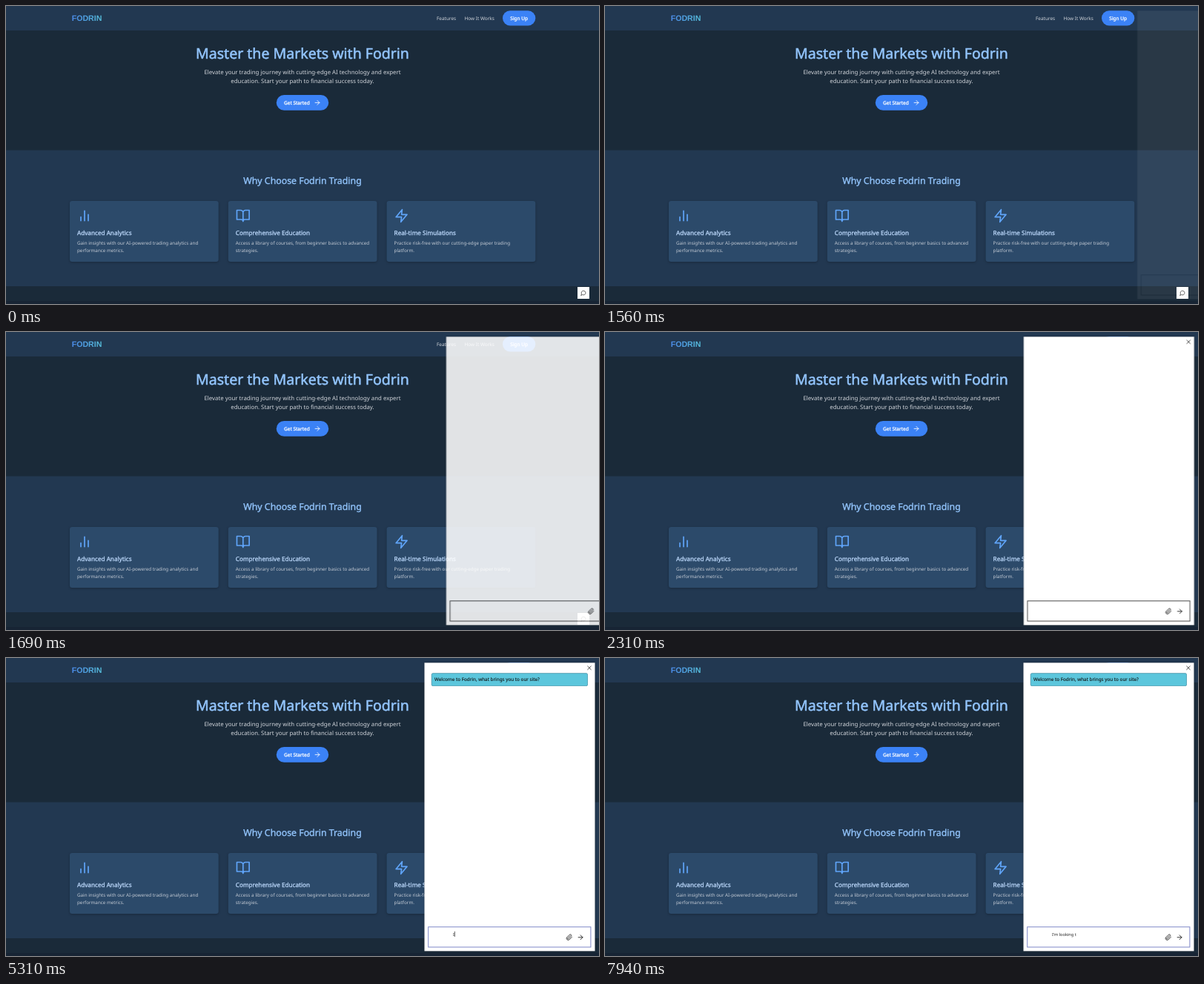
Recreate the animation shown at these times as an HTML page. Size 800 by 402 pixels, loop 8000 ms.

```html
<!DOCTYPE html>
<html lang="en">
<head>
<meta charset="utf-8">
<title>Fodrin Trading</title>
<style>
  html, body { margin: 0; width: 100%; height: 100%; overflow: hidden; background: #1a2a39; }
  svg { display: block; width: 100vw; height: 100vh; }
  text { font-family: "Noto Sans", sans-serif; text-rendering: geometricPrecision; white-space: pre; }

  .band { fill: #223851; }
  .card { fill: #2c4a6a; filter: drop-shadow(0 1px 1.5px #0004); }
  .pill { fill: #3b82f6; }
  .center { text-anchor: middle; }
  .logo { font: bold 10.6px "Liberation Sans", sans-serif; fill: url(#brand); }
  .nav { font-size: 6.45px; fill: #d1d5db; }
  .label { font-size: 6.5px; fill: #fff; stroke: #fff; stroke-width: .28px; }
  .hero { font-size: 19.55px; fill: #93c5fd; stroke: #93c5fd; stroke-width: .5px; }
  .lead { font-size: 7.83px; fill: #d1d5db; }
  .heading { font-size: 12.34px; fill: #93c5fd; stroke: #93c5fd; stroke-width: .35px; }
  .title { font-size: 8.17px; fill: #bfdbfe; stroke: #bfdbfe; stroke-width: .25px; }
  .body { font-size: 6.27px; fill: #c3cad4; }

  .icon { fill: none; stroke: #60a5fa; stroke-width: 2; stroke-linecap: round; stroke-linejoin: round; }
  .icon.light { stroke: #fff; }
  .icon.dark { stroke: #111; }

  .sheet { fill: #fff; filter: drop-shadow(0 .5px 1.2px #0006); }
  .bubble rect { fill: #5cc6dc; stroke: #4aa3bb; stroke-width: .7; filter: drop-shadow(0 .8px .7px #0006); }
  .bubble text { font-size: 6.33px; fill: #111; stroke: #111; stroke-width: .1px; }
  .field { fill: #fff; stroke: #4b4b4b; stroke-width: 1; }
  #typed { font-size: 5.6px; fill: #222; }
  #caret { fill: #222; }

  #panel { animation: reveal 8s infinite; }
  .bubble { animation: greet 8s linear infinite; }
  .field { animation: focus 8s linear infinite; }
  @keyframes reveal {
    0%, 18.98% { opacity: 0; animation-timing-function: ease-in-out; }
    21.85%, 100% { opacity: 1; }
  }
  @keyframes greet { 0%, 35.5% { opacity: 0; } 39.1%, 100% { opacity: 1; } }
  @keyframes focus { 0%, 53.4% { stroke: #4b4b4b; } 55.5%, 100% { stroke: #7f88c8; } }
</style>
</head>
<body>
<svg viewBox="0 0 800 402" preserveAspectRatio="none">
  <defs>
    <linearGradient id="brand">
      <stop offset="0" stop-color="#4b8ae8"/>
      <stop offset="1" stop-color="#55bcd8"/>
    </linearGradient>
    <path id="arrow" d="M5 12h14M12 5l7 7-7 7"/>
  </defs>

  <rect width="800" height="402" fill="#1a2a39"/>
  <rect class="band" width="800" height="33"/>
  <rect class="band" y="194.5" width="800" height="183.5"/>
  <rect y="398" width="800" height="4" fill="#172434"/>

  <text class="logo" x="88.7" y="20.4">FODRIN</text>
  <text class="nav" x="581" y="18.7">Features</text>
  <text class="nav" x="618.5" y="18.7">How It Works</text>
  <rect class="pill" x="670" y="6.3" width="44.3" height="20.2" rx="10.1"/>
  <text class="label center" x="692.2" y="18.7">Sign Up</text>

  <text class="hero center" x="400" y="71">Master the Markets with Fodrin</text>
  <text class="lead center" x="400" y="92.4">Elevate your trading journey with cutting-edge AI technology and expert</text>
  <text class="lead center" x="400" y="104.1">education. Start your path to financial success today.</text>
  <rect class="pill" x="364.8" y="120" width="70.4" height="20.8" rx="10.4"/>
  <text class="label" x="375" y="132.7">Get Started</text>
  <use class="icon light" href="#arrow" transform="translate(415 125.4) scale(.4167)"/>

  <text class="heading center" x="400" y="240.4">Why Choose Fodrin Trading</text>

  <g transform="translate(86 263)">
    <rect class="card" width="200.7" height="82" rx="3.3"/>
    <path class="icon" transform="translate(10 10) scale(.8333)" d="M18 20V10M12 20V4M6 20v-6"/>
    <text class="title" x="10" y="45.8">Advanced Analytics</text>
    <text class="body" x="10" y="59.4">Gain insights with our AI-powered trading analytics and</text>
    <text class="body" x="10" y="69.3">performance metrics.</text>
  </g>
  <g transform="translate(299.8 263)">
    <rect class="card" width="200.7" height="82" rx="3.3"/>
    <path class="icon" transform="translate(10 10) scale(.8333)"
      d="M2 3h6a4 4 0 0 1 4 4v14a3 3 0 0 0-3-3H2zM22 3h-6a4 4 0 0 0-4 4v14a3 3 0 0 1 3-3h7z"/>
    <text class="title" x="10" y="45.8">Comprehensive Education</text>
    <text class="body" x="10" y="59.4">Access a library of courses, from beginner basics to advanced</text>
    <text class="body" x="10" y="69.3">strategies.</text>
  </g>
  <g transform="translate(513.6 263)">
    <rect class="card" width="200.7" height="82" rx="3.3"/>
    <path class="icon" transform="translate(10 10) scale(.8333)" d="M13 2L3 14h9l-1 8 10-12h-9z"/>
    <text class="title" x="10" y="45.8">Real-time Simulations</text>
    <text class="body" x="10" y="59.4">Practice risk-free with our cutting-edge paper trading</text>
    <text class="body" x="10" y="69.3">platform.</text>
  </g>

  <rect x="771" y="379" width="16" height="16" fill="#fff"/>
  <path class="icon dark" transform="translate(775.2 383.2) scale(.32)"
    d="M7.9 20A9 9 0 1 0 4 16.1L2 22z"/>

  <g id="panel">
    <rect class="sheet" x="564.5" y="6.4" width="230" height="389"/>
    <path class="icon dark" transform="translate(782.4 8.8) scale(.38)" stroke-width="2.4" d="M18 6L6 18M6 6l12 12"/>
    <g class="bubble">
      <rect x="574.3" y="20.8" width="210.2" height="16.8" rx="1.6"/>
      <text x="578" y="31.3">Welcome to Fodrin, what brings you to our site?</text>
    </g>
    <rect class="field" x="569.7" y="362.8" width="219.2" height="27.2"/>
    <text id="typed" x="603" y="374.6"></text>
    <rect id="caret" y="368.8" width=".7" height="7.2"/>
    <path class="icon dark" transform="translate(755.3 372.3) scale(.38)"
      d="M21.4 11.1l-9.2 9.1a6 6 0 0 1-8.5-8.4l9.2-9.2a4 4 0 0 1 5.7 5.6l-9.2 9.2a2 2 0 0 1-2.9-2.8l8.5-8.5"/>
    <use class="icon dark" href="#arrow" transform="translate(770 371.8) scale(.42)"/>
  </g>
</svg>
<script>
  const LOOP = 8000;
  const SLIDE_START = 1468;
  const MESSAGE = "I'm looking t";
  const KEY_TIMES = [5310, 5560, 6060, 6250, 6690, 6880, 7060, 7250, 7440, 7630, 7730, 7830, 7940];

  const panel = document.getElementById("panel");
  const typed = document.getElementById("typed");
  const caret = document.getElementById("caret");

  // Underdamped spring: 1 at rest position off stage, settling to 0.
  function spring(seconds) {
    if (seconds <= 0) return 1;
    const decay = 8.4, freq = 8;
    return Math.exp(-decay * seconds) *
      (Math.cos(freq * seconds) + decay / freq * Math.sin(freq * seconds));
  }

  function render(time) {
    const offset = 230 * spring((time - SLIDE_START) / 1000);
    panel.setAttribute("transform", `translate(${offset.toFixed(2)} 0)`);

    const count = KEY_TIMES.filter(key => time >= key).length;
    const text = MESSAGE.slice(0, count);
    if (typed.textContent !== text) typed.textContent = text;
    const typing = count > 0 && count < MESSAGE.length;
    caret.setAttribute("visibility", typing ? "visible" : "hidden");
    if (typing) caret.setAttribute("x", 603 + typed.getComputedTextLength());
  }

  let start;
  function tick(now) {
    start ??= now;
    render((now - start) % LOOP);
    requestAnimationFrame(tick);
  }
  render(0);
  requestAnimationFrame(tick);
</script>
</body>
</html>
```
